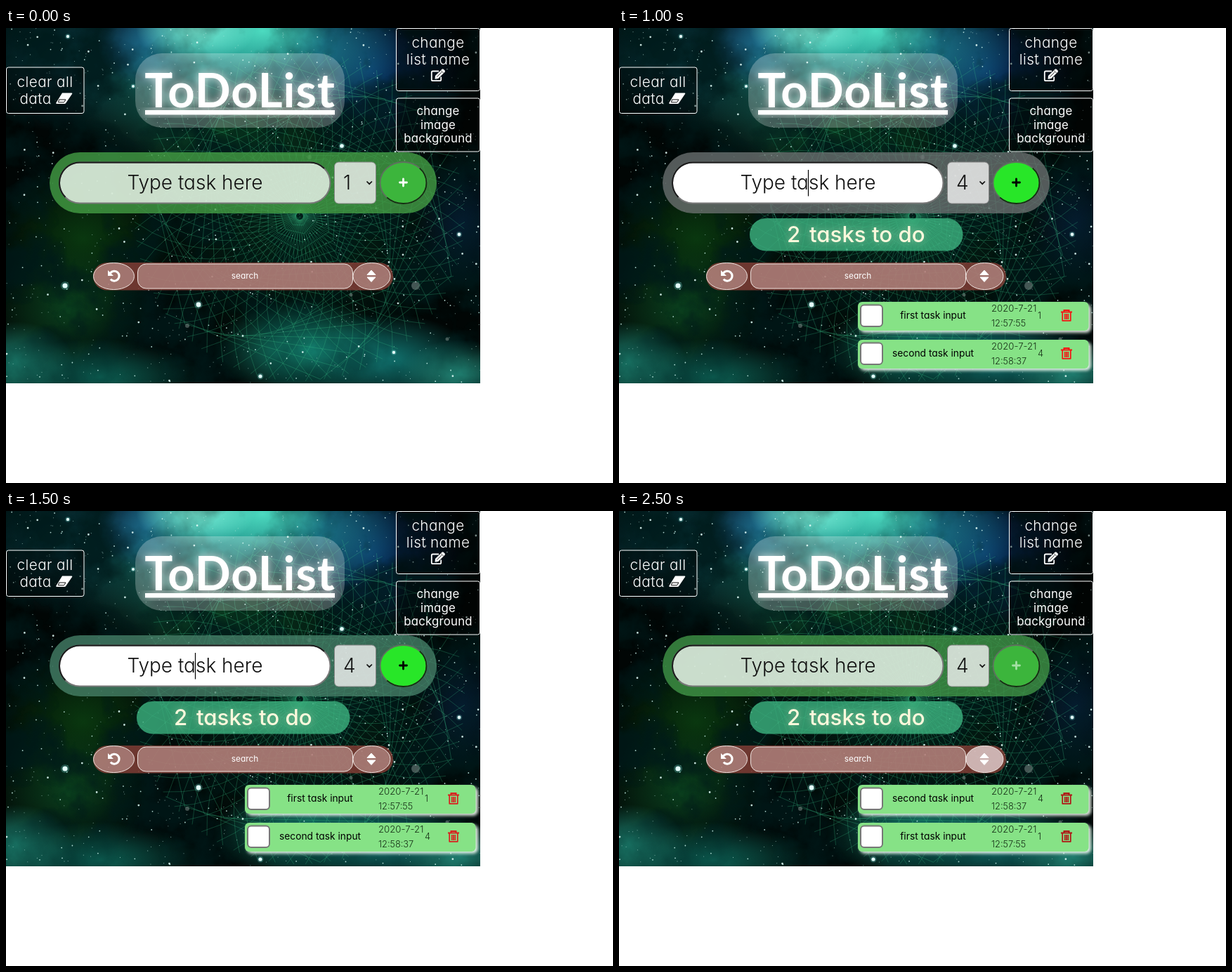
Write an HTML page that moves like this. It is 864 by 648 pixels and loops after 3000 ms.

```html
<!DOCTYPE html>
<html lang="en">
<head>
<meta charset="utf-8">
<title>ToDoList</title>
<style>
html, body { margin: 0; width: 100%; height: 100%; overflow: hidden; background: #fff; }
svg { display: block; width: 864px; height: 648px; }
text { font-family: Inter, "Open Sans", sans-serif; font-feature-settings: "cv11"; white-space: pre; }
.mid { text-anchor: middle; }
.thin { font-weight: 300; }
</style>
</head>
<body>
<svg viewBox="0 0 864 648" xmlns="http://www.w3.org/2000/svg">
  <defs>
    <clipPath id="page"><rect width="675" height="506"/></clipPath>
    <filter id="glow" x="-20%" y="-60%" width="140%" height="220%"><feGaussianBlur stdDeviation="6"/></filter>
    <filter id="soft" x="-10%" y="-40%" width="120%" height="180%"><feGaussianBlur stdDeviation="2.2"/></filter>
    <filter id="smoke" x="0" y="0" width="100%" height="100%">
      <feTurbulence type="fractalNoise" baseFrequency=".013" numOctaves="5" seed="8"/>
      <feColorMatrix values="0 0 0 0 0  0 0 0 0 .01  0 0 0 0 .01  3.4 0 0 0 -1.35"/>
    </filter>
  </defs>
  <g clip-path="url(#page)">
    <g id="sky"></g>
    <g id="ui"></g>
  </g>
</svg>
<script>
const byId = id => document.getElementById(id);

let seed = 41;
const rand = () => (seed = (seed * 16807) % 2147483647) / 2147483647;

function text(x, y, size, str, more = 'fill="#fff" class="mid"') {
  return `<text x="${x}" y="${y}" font-size="${size}" ${more}>${str}</text>`;
}
function box(x, y, w, h, r, fill, stroke = 'none', width = 1) {
  return `<rect x="${x}" y="${y}" width="${w}" height="${h}" rx="${r}" fill="${fill}" stroke="${stroke}" stroke-width="${width}"/>`;
}
function oval(x, y, rx, ry, fill, stroke = 'none', width = 1) {
  return `<ellipse cx="${x}" cy="${y}" rx="${rx}" ry="${ry}" fill="${fill}" stroke="${stroke}" stroke-width="${width}"/>`;
}
function line(d, stroke, width, more = '') {
  return `<path d="${d}" fill="none" stroke="${stroke}" stroke-width="${width}" ${more}/>`;
}

// x, y, rx, ry, colour
const haze = [
  [100, 50, 170, 100, '#0b4650'], [520, 60, 140, 120, '#0a3a6c'],
  [230, 110, 140, 90, '#105046'], [330, 160, 150, 90, '#0d4822'],
  [110, 300, 130, 110, '#0a3a10'], [90, 400, 120, 90, '#0b421f'],
  [420, 270, 240, 210, '#04261a'], [300, 40, 170, 90, '#1a8581']
];
const clouds = [
  [205, 20, 75, 65, '#1b5688'], [440, 30, 120, 85, '#1d7c90'],
  [310, 25, 150, 75, '#219c92'], [365, 4, 95, 55, '#4fe0c4'],
  [270, 0, 85, 52, '#86ffe6'], [425, 458, 130, 70, '#17907c'],
  [545, 472, 120, 65, '#127a76'], [645, 494, 85, 50, '#238a7a'],
  [130, 498, 150, 55, '#0e6659'], [12, 478, 85, 60, '#1f8a77'],
  [650, 280, 70, 90, '#061e34']
];

function blobs(list, name) {
  return list.map(([x, y, rx, ry, c], i) =>
    `<radialGradient id="${name}${i}"><stop offset="0" stop-color="${c}" stop-opacity=".95"/>` +
    `<stop offset=".5" stop-color="${c}" stop-opacity=".5"/><stop offset="1" stop-color="${c}" stop-opacity="0"/></radialGradient>` +
    oval(x, y, rx, ry, `url(#${name}${i})`)).join('');
}
function sky() {
  const smoke = alpha => `<rect width="675" height="506" filter="url(#smoke)" opacity="${alpha}"/>`;
  return box(0, 0, 675, 506, 0, '#010605') + blobs(haze, 'haze') + smoke(.75) +
    blobs(clouds, 'cloud') + smoke(.3) + mesh() + stars();
}

const polar = (r, a) => `${(418 + r * Math.cos(a)).toFixed(1)} ${(268 + r * Math.sin(a)).toFixed(1)}`;

// Curved arms from the centre to the rim; a negative twist bends them the other way.
function arms(count, twist) {
  let d = '';
  for (let k = 0; k < count; k++) {
    const a = k / count * 2 * Math.PI;
    d += 'M' + polar(5, a);
    for (let t = .1; t < 1.01; t += .1) d += 'L' + polar(235 * t, a + twist * t);
  }
  return d;
}
// Polygon that winds outward, turning by a fixed angle at each step.
function winding(steps, turn) {
  let d = 'M418 268';
  for (let i = 1; i <= steps; i++) d += 'L' + polar(236 * i / steps, i * turn * Math.PI / 180);
  return d;
}
function mesh() {
  const color = '#3cc48a';
  return line(arms(56, .75), color, .65, 'opacity=".42"') +
    line(arms(56, -.75), color, .65, 'opacity=".42"') +
    line(winding(120, 61.2), color, .7, 'opacity=".42"');
}

function stars() {
  const dots = (n, width, color, alpha) => {
    let d = '';
    while (n--) d += `M${(rand() * 675).toFixed(1)} ${(rand() * 506).toFixed(1)}h.01`;
    return line(d, color, width, `stroke-linecap="round" opacity="${alpha}"`);
  };
  const bright = [[84, 367, 3.6], [274, 394, 3.4], [478, 168, 2.8], [88, 12, 2.2], [181, 83, 2], [645, 294, 2.4], [552, 462, 2.2], [362, 496, 2.6]];
  const dull = [[583, 367, 6], [258, 424, 3], [432, 184, 3], [628, 443, 2.5], [491, 380, 2.5]];
  return dots(750, 1.1, '#bfe9e0', .65) + dots(260, 1.8, '#d8fff8', .8) + dots(60, 2.8, '#e6fffb', .85) +
    bright.map(([x, y, r]) => oval(x, y, r * 1.7, r * 1.7, 'rgba(130,240,230,.25)') + oval(x, y, r, r, '#e2fffb')).join('') +
    dull.map(([x, y, r]) => oval(x, y, r, r, 'rgba(150,165,160,.45)')).join('');
}

function header() {
  const title = more => text(333, 113, 67, 'ToDoList', `class="mid" style="font-family:Lato,sans-serif" font-weight="700" letter-spacing="1" fill="#fff" ${more}`) +
    `<rect x="198" y="117" width="270" height="6.5" fill="#fff" ${more}/>`;
  const label = 'fill="#fff" class="mid thin" letter-spacing=".4"';
  const small = 'fill="#fff" class="mid" letter-spacing=".2"';
  const dark = 'rgba(0,0,0,.4)';
  return box(184, 36, 298, 106, 38, 'rgba(255,255,255,.25)') +
    title('filter="url(#glow)" opacity=".75"') + title('') +
    box(.5, 56, 110.5, 65.5, 3, 'rgba(0,0,0,.35)', '#fff') +
    text(55.5, 83.5, 20.7, 'clear all', label) + text(42, 107.5, 20.7, 'data', label) +
    '<path d="M80 92.5H93.5Q95 92.5 94 94L85.500 106.500Q84.500 108 83 108H72.500Q70.500 108 71.500 106.300Z" fill="#fff"/>' +
    line('M75.500 102H85L82.500 105.800H74.500Z', '#111', 1) +
    box(555.5, .5, 119, 89, 3, dark, '#fff') +
    text(615, 27.5, 20.7, 'change', label) + text(615, 51.5, 20.7, 'list name', label) +
    line('M616 61.500H607.500Q605.800 61.500 605.800 63.200V73.500Q605.800 75.200 607.500 75.200H617.500Q619.200 75.200 619.200 73.500V69.500', '#fff', 1.8) +
    '<path d="M611 68L620.500 58.700Q621.800 57.800 623 59L624.500 60.500Q625.500 61.700 624.500 62.800L615.200 72L610.500 72.700Z" fill="#fff"/>' +
    line('M613.500 69.500L620 63M619 60.500L622.700 64.200', '#111', .9) +
    box(555.5, 100, 119, 76, 3, dark, '#fff') +
    text(615, 124, 16.8, 'change', small) + text(615, 143.5, 16.8, 'image', small) + text(615, 163, 16.8, 'background', small);
}

function entry(s) {
  const black = 'fill="#111" class="thin"';
  return box(62, 177, 551, 87, 43.5, s.bar) +
    box(76, 191.5, 385.5, 58, 29, s.active ? '#fff' : 'rgba(255,255,255,.74)', '#777', 2) +
    line('M84.500 241A29 29 0 0 1 105 191.500H432.500A29 29 0 0 1 453 200', '#1b1b1b', 2) +
    text(269, 230, 28, 'Type task here', 'fill="#111" class="mid thin"') +
    (s.caret ? line('M269.500 202V239.500', '#000', 1.2) : '') +
    box(467.5, 191, 59, 59, 6, 'rgba(239,239,239,.82)', '#858585') +
    text(480, 230, 28, s.level, black) +
    line('M513.500 218.500L517.200 222.200L520.900 218.500', '#111', 1.7) +
    oval(565.5, 220.5, 33, 29.5, s.active ? '#28e628' : '#3cb53c', '#5f705f', 1.8) +
    line('M588.800 199.600A33 29.500 0 0 1 542.200 241.400', '#12300f', 1.8) +
    line('M560.500 220H570.500M565.500 215V225', s.plus, 2.8, 'stroke-linecap="round"');
}

function counter(n) {
  if (!n) return '';
  const x = n > 1 ? [239, 271] : [251, 275];
  const words = more => ['' + n, n > 1 ? 'tasks to do' : 'task to do']
    .map((w, i) => text(x[i], 305, 31.2, w, `font-weight="500" fill="#fdf8dc" ${more}`)).join('');
  return box(186, 271, 303.5, 46.5, 23, 'rgba(60,179,128,.8)') +
    words('filter="url(#glow)" opacity=".45"') + words('');
}

function search(s) {
  const fill = 'rgba(190,150,145,.65)', edge = '#eee3df';
  return box(124, 334, 427, 39.5, 20, 'rgba(146,66,58,.75)') +
    oval(153.5, 353.5, 29, 19, fill, edge) +
    line('M148.500 349A7 7 0 1 1 148.800 357.800', '#fff', 3.1) +
    '<path d="M145 345V353H153Z" fill="#fff"/>' +
    box(187.5, 336, 306, 35, 12, fill, edge) +
    text(340, 357, 11.9, 'search') +
    oval(520.5, 353.5, 26.5, 19, s.sorted ? 'rgba(225,205,206,.82)' : fill, edge) +
    '<path d="M514 351.500L520 345L526 351.500ZM514 355L520 361.500L526 355Z" fill="#fff" stroke="#fff" stroke-linejoin="round"/>';
}

const first = ['first task input', '12:57:55', 1];
const second = ['second task input', '12:58:37', 4];

function row([name, time, level], i, red) {
  const date = 'fill="#163016" class="thin"';
  return `<g transform="translate(0 ${i * 54})">` +
    '<rect x="343" y="393" width="329" height="41" rx="7" fill="#f4fff4" opacity=".9" filter="url(#soft)"/>' +
    box(340, 390, 328.5, 41, 6, '#86e286') +
    box(344, 394.5, 31, 30.5, 5, '#fff', '#777', 2) +
    text(447, 414, 13.8, name, 'fill="#000" class="mid"') +
    text(530, 404, 13.2, '2020-7-21', date) + text(530, 425, 12.8, time, date) +
    text(596, 414, 12.8, level, date) +
    line('M629 404.500H645M633.500 404V402H640.500V404', red, 2) +
    line('M631.200 405V416.800H642.800V405M634.700 407V415M637 407V415M639.300 407V415', red, 1.7, 'stroke-linejoin="round"') +
    '</g>';
}

const scene = (bar, active, caret, level, plus, red, rows, sorted) =>
  ({ bar, active, caret, level, plus, red, rows, sorted });
const scenes = [
  scene('rgba(70,160,70,.78)', false, false, 1, '#fff', '', []),
  scene('rgba(148,152,76,.78)', true, true, 1, '#063c06', '#b8251f', [first]),
  scene('rgba(112,116,116,.75)', true, true, 4, '#000', '#f51414', [first, second]),
  scene('rgba(74,134,108,.75)', true, true, 4, '#000', '#da1e1e', [first, second]),
  scene('rgba(124,126,100,.75)', true, false, 4, '#000', '#e81919', [first, second]),
  scene('rgba(66,152,72,.78)', false, false, 4, '#a4dfa4', '#b01515', [second, first], true)
];

byId('sky').innerHTML = sky() + header();

let shown = -1;
function draw() {
  const now = Math.floor(performance.now() % 3000 / 500);
  if (now !== shown) {
    const s = scenes[shown = now];
    byId('ui').innerHTML = entry(s) + counter(s.rows.length) + search(s) +
      s.rows.map((r, i) => row(r, i, s.red)).join('');
  }
  requestAnimationFrame(draw);
}
draw();
</script>
</body>
</html>
```
